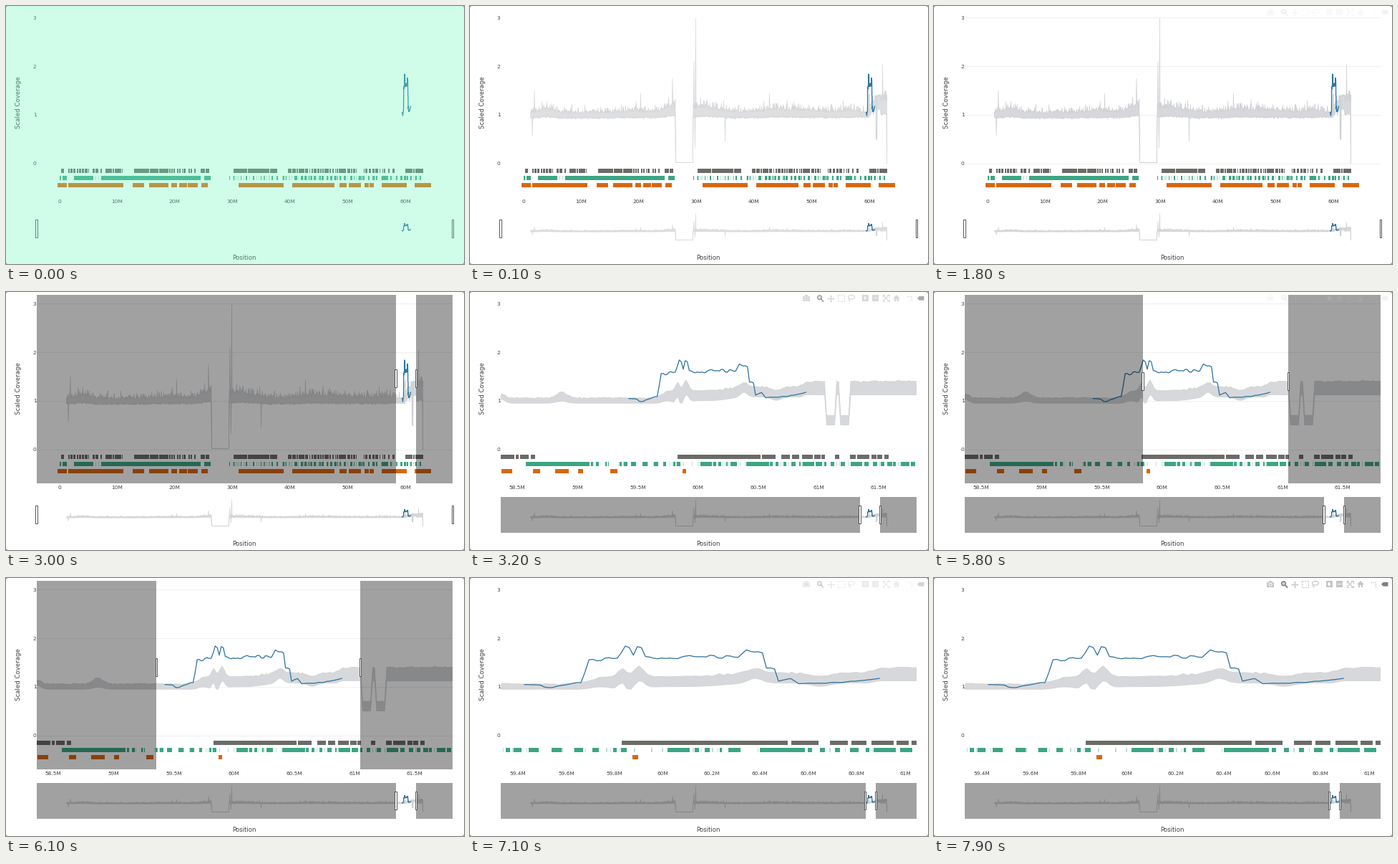
These frames come from a looping animation (640x360 px, 8 s). A matplotlib script:

```python
import math

import matplotlib.pyplot as plt
import numpy as np
from matplotlib.animation import FuncAnimation
from matplotlib.patches import Circle, Polygon, Rectangle

W, H, DPI = 640, 360, 100
STEP, COUNT = 100, 80
LEFT, RIGHT, TOP, BOTTOM = 43, 623.5, 3.5, 267
VIEWS = [(-3.907, 68.1), (58.363, 61.81), (59.329, 61.046)]
TICK_STEP = [10, 0.5, 0.2]
INK, BLUE, BAND = "#404040", "#2f76a3", "#d7d8db"
GRAY, GREEN, ORANGE, PALE = "#6b6b68", "#3ca584", "#d6680f", "#b9e0d3"
SHADE = 0.37
BIN = 1 / 60  # width of one coverage bin, in M

plt.rcParams["font.family"] = "DejaVu Sans"
rng = np.random.default_rng(11)
fig = plt.figure(figsize=(W / DPI, H / DPI), dpi=DPI, facecolor="white")
ax = fig.add_axes([0, 0, 1, 1])
ax.set_xlim(0, W)
ax.set_ylim(H, 0)
ax.axis("off")


def pt(px):
    return px * 72 / DPI


def to_px(mb, view):
    lo, hi = VIEWS[view]
    return LEFT + (np.asarray(mb, float) - lo) / (hi - lo) * (RIGHT - LEFT)


def main_y(v):
    return 219.5 - 67.7 * v


def slider_y(v):
    return 326.3 - 12.4 * v


def clamp(u):
    return min(max(u, 0), 1)


def label(x, y, text, size, **kw):
    return ax.text(x, y, text, fontsize=pt(size), color=INK,
                   va="baseline", **kw)


def line(x, y, color, width, **kw):
    return ax.plot(x, y, color=color, lw=pt(width), **kw)[0]


def rect(x0, y0, x1, y1, **kw):
    return ax.add_patch(Rectangle((x0, y0), x1 - x0, y1 - y0, **kw))


# ---- coverage data -------------------------------------------------

def bump(x, at, width, height):
    return height * np.exp(-((x - at) / width) ** 2)


def rise(x, at, width, height):
    return height / (1 + np.exp((at - x) / width * 2))


def far_band(x):
    """Rough band over the whole range, with a gap and a few spikes."""
    up = (1.035 + bump(x, 3.8, 1.7, 0.08) + bump(x, 20, 5, 0.03)
          + bump(x, 25.6, 1.5, 0.1) + bump(x, 31, 4, 0.1)
          + bump(x, 46, 7, 0.06) + bump(x, 57, 2, 0.05)
          + bump(x, 62.5, 1.5, 0.25))
    low = 0.94 + 0.35 * (up - 1.035) + rng.normal(0, 0.012, x.size)
    up += np.minimum(rng.exponential(0.36 * (up - 0.94)), 0.22)
    gap = (x > 26.3) & (x < 29.4)
    up[gap] = low[gap] = 0.02
    for at, v in [(1.85, 1.5), (20.3, 1.45), (25.8, 1.76), (29.55, 2.1),
                  (29.85, 3), (42.6, 1.44), (55.4, 1.3), (62.25, 2.05)]:
        up[np.argmin(abs(x - at))] = v
    for at, v in [(1.5, 0.57), (29.7, 0.32), (34.9, 0.46), (62.95, 0)]:
        low[np.argmin(abs(x - at))] = v
    return up, low


def near_band(x):
    """Smooth band around the sample, with two deep dips."""
    up = (1.06 + rise(x, 59.7, 0.04, 0.15) + rise(x, 60.25, 0.1, 0.08)
          + rise(x, 60.87, 0.03, 0.11) + bump(x, 58.37, 0.04, 0.08)
          + bump(x, 58.87, 0.06, 0.12) + bump(x, 59.83, 0.02, 0.18)
          + bump(x, 59.9, 0.03, 0.2) + bump(x, 60.38, 0.04, 0.1)
          + bump(x, 60.65, 0.06, -0.07))
    thick = (0.11 + rise(x, 59.7, 0.05, 0.1) + rise(x, 60.87, 0.05, 0.07)
             + bump(x, 58.87, 0.06, 0.08) + bump(x, 59.86, 0.06, 0.12))
    low = up - thick
    up = up + rng.normal(0, 0.008, x.size)
    dip = ((x > 61.055) & (x < 61.145)) | ((x > 61.18) & (x < 61.26))
    return np.where(dip, 0.7, up), np.where(dip, 0.5, low)


def build_band():
    far = np.arange(1.2, 62.98, 0.06)
    near = np.arange(58.35, 61.83, BIN)
    far_up, far_low = far_band(far)
    up, low = near_band(near)
    a, b = far < near[0], far > near[-1]
    return (np.r_[far[a], near, far[b]],
            np.r_[far_up[a], up, far_up[b]],
            np.r_[far_low[a], low, far_low[b]])


SAMPLE_KEYS = [
    (59.427, 1.04), (59.49, 1.04), (59.51, 0.99), (59.54, 0.99),
    (59.64, 1.09), (59.67, 1.09), (59.685, 1.55), (59.82, 1.6),
    (59.835, 1.86), (59.855, 1.86), (59.87, 1.62), (59.885, 1.62),
    (59.9, 1.96), (59.92, 1.64), (60.05, 1.56), (60.1, 1.66),
    (60.31, 1.59), (60.34, 1.77), (60.41, 1.71), (60.425, 1.38),
    (60.46, 1.38), (60.475, 1.12), (60.53, 1.18), (60.56, 1.06),
    (60.75, 1.09), (60.897, 1.18)]


def build_sample():
    x = np.arange(59.427, 60.9, BIN)
    v = np.interp(x, *zip(*SAMPLE_KEYS))
    wobble = np.repeat(rng.uniform(-1, 1, x.size), 2)[:x.size]
    return x, v + wobble * np.where(v > 1.5, 0.035, 0.008)


band_mb, band_up, band_low = build_band()
sample_mb, sample_v = build_sample()
plot_box = Rectangle((LEFT, TOP), RIGHT - LEFT, BOTTOM - TOP,
                     transform=ax.transData)


def draw_band(view, y, edge):
    poly = ax.fill_between(to_px(band_mb, view), y(band_up), y(band_low),
                           facecolor=BAND, edgecolor="#d0d1d4", lw=pt(edge),
                           zorder=1)
    if y is main_y:
        poly.set_clip_path(plot_box)
    return poly


def draw_sample(view, y):
    return line(to_px(sample_mb, view), y(sample_v), BLUE, 1.3, zorder=2)


# ---- annotation rows -----------------------------------------------

def spans(lo, hi, bar, gap):
    """Random bars and gaps of the given mean sizes between lo and hi."""
    out = []
    while lo < hi:
        end = min(lo + bar * rng.uniform(0.3, 1.7), hi)
        out.append((lo, end))
        lo = end + gap * rng.uniform(0.3, 1.7)
    return out


far_rows = [
    (227, GRAY, 0.3,
     spans(0.4, 8, 0.25, 0.5) + spans(8, 11, 0.3, 0.1)
     + spans(13, 19.3, 0.3, 0.1) + spans(19.5, 24, 0.15, 0.6)
     + spans(24.5, 25.9, 0.3, 0.15) + spans(30.2, 37.7, 0.3, 0.12)
     + spans(39.7, 51.6, 0.25, 0.2) + spans(52.8, 58.4, 0.2, 0.3)
     + spans(60, 63, 0.3, 0.1)),
    (237, PALE, 0, spans(29.5, 63, 0.1, 0.3) + spans(5.9, 7.3, 0.1, 0.3)),
    (237, GREEN, 0.3,
     [(0.1, 0.3), (0.6, 1.3), (2.6, 5.8), (7.3, 24.5), (25.1, 26.2),
      (55.9, 57)] + spans(29.5, 41, 0.1, 0.9) + spans(41, 63, 0.2, 0.5)),
    (247, ORANGE, 0.4,
     [(-0.2, 1.3), (1.6, 11.1), (12.8, 14.7), (15.6, 18.9), (19.5, 20.4),
      (20.8, 22.1), (22.3, 24), (24.7, 25.7), (31.1, 38.9), (40.4, 47.6),
      (48.6, 49.8), (50.2, 52.2), (52.9, 53.6), (53.8, 54.5), (55.9, 60.2),
      (61.6, 64.4)]),
]

near_rows = [
    (227, GRAY, 0.3,
     spans(58.36, 58.65, 0.07, 0.01)
     + [(59.83, 60.515), (60.53, 60.64)] + spans(60.69, 61.05, 0.06, 0.014)
     + [(61.14, 61.17)] + spans(61.26, 61.58, 0.07, 0.015)),
    (237, PALE, 0, spans(59.1, 61.8, 0.004, 0.04)),
    (237, GREEN, 0.3,
     [(58.57, 59.095), (60.02, 60.11), (60.27, 60.32), (60.4, 60.585),
      (60.87, 60.96), (60.98, 61.03), (61.27, 61.36)]
     + spans(59.11, 59.3, 0.01, 0.05) + spans(59.35, 59.85, 0.025, 0.045)
     + spans(60.13, 60.25, 0.015, 0.03) + spans(60.6, 60.85, 0.02, 0.03)
     + spans(61.05, 61.26, 0.02, 0.04) + spans(61.38, 61.81, 0.04, 0.03)),
    (247, ORANGE, 1,
     [(c - w / 2, c + w / 2) for c, w in
      [(58.415, 0.08), (58.66, 0.05), (58.87, 0.1), (59.025, 0.035),
       (59.3, 0.05), (59.885, 0.02)]]),
]


def draw_row(view, y, color, pad, bars):
    lo, hi = VIEWS[view]
    ends = [to_px((max(a, lo), min(b, hi)), view)
            for a, b in bars if b > lo and a < hi]
    return ax.broken_barh([(a - pad, b - a + 2 * pad) for a, b in ends],
                          (y - 0.3, 6.6), facecolor=color, lw=0, zorder=1.5)


def draw_view(view):
    items = [draw_band(view, main_y, 0.7), draw_sample(view, main_y)]
    items += [draw_row(view, *row) for row in (near_rows if view else far_rows)]
    lo, hi = VIEWS[view]
    step = TICK_STEP[view]
    for k in range(math.ceil(lo / step), math.floor(hi / step) + 1):
        mb = round(k * step, 2)
        text = f"{mb:g}M" if mb else "0"
        items.append(label(to_px(mb, view), 274.8, text, 7.4, ha="center"))
    return items


# ---- fixed parts ---------------------------------------------------

grid = [line([LEFT, RIGHT], [main_y(v)] * 2, "#f0f0f0", 1, zorder=0.5)
        for v in range(4)]
for v in range(4):
    label(42.5, main_y(v) + 2.7, str(v), 7.4, ha="right")
label(333.2, 354, "Position", 8.7, ha="center")
label(20.4, 135, "Scaled Coverage", 8.6, ha="center", rotation=90,
      rotation_mode="anchor")
for cx in (0, W):
    for cy in (0, H):
        dx, dy = (-2 if cx else 2), (-2 if cy else 2)
        ax.add_patch(Polygon([(cx, cy), (cx + dx, cy), (cx, cy + dy)],
                             color="#8c8c8c", lw=0))

views = [draw_view(v) for v in range(3)]
main_band = views[0][0]
slider_band = draw_band(0, slider_y, 0.6)
draw_sample(0, slider_y)


def mask():
    return rect(0, 0, 0, 0, facecolor="black", lw=0, alpha=SHADE, zorder=4)


def grip():
    return rect(0, 0, 2.4, 25, facecolor="white", edgecolor="#444444",
                lw=pt(0.9), zorder=5)


drag_masks, slider_masks = [mask(), mask()], [mask(), mask()]
drag_grips, slider_grips = [grip(), grip()], [grip(), grip()]


def place(masks, grips, lo, hi, y0, y1, grip_y):
    masks[0].set_bounds(LEFT, y0, lo - LEFT, y1 - y0)
    masks[1].set_bounds(hi, y0, RIGHT - hi, y1 - y0)
    grips[0].set_xy((lo - 1.7, grip_y))
    grips[1].set_xy((hi - 0.9, grip_y))


# ---- toolbar -------------------------------------------------------

def build_toolbar():
    soft, strong = "#c6c6c6", "#808080"
    mid = 8.5
    parts = []

    def box(x, y, w, h, color=soft):
        parts.append(rect(x - w / 2, y - h / 2, x + w / 2, y + h / 2,
                          facecolor=color, lw=0, zorder=6))

    def stroke(xs, ys, color=soft, width=1.2, **kw):
        parts.append(line(xs, ys, color, width, zorder=6.2, **kw))

    def ring(x, y, r, edge, width, fill):
        parts.append(ax.add_patch(Circle((x, y), r, facecolor=fill,
                                         edgecolor=edge, lw=pt(width),
                                         zorder=6.1)))

    def shape(points, color):
        parts.append(ax.add_patch(Polygon(points, color=color, lw=0,
                                          zorder=6)))

    # camera, magnifier
    box(470.2, 9, 9.5, 7)
    box(470.2, 5, 4.5, 2)
    ring(470.2, 9, 2, "white", 1, soft)
    ring(488.5, 7.7, 2.9, strong, 1.5, "#d0d0d0")
    stroke([490.7, 493.5], [10, 13], strong, 1.8)
    # pan arrows
    for dx, dy, mark in [(-4, 0, "<"), (4, 0, ">"), (0, -4, "^"), (0, 4, "v")]:
        stroke([504, 504 + dx], [mid, mid + dy], marker=mark, ms=pt(2.6),
               mew=0, markevery=[1])
    # box and lasso selection
    stroke([514, 523, 523, 514, 514], [4, 4, 13, 13, 4], dashes=(1.6, 1.2))
    a = np.linspace(0, 2 * np.pi, 30)
    stroke(533 + 4.5 * np.cos(a), 7.3 + 2.8 * np.sin(a))
    stroke([530, 529.5, 531], [9.5, 11, 12.8])
    # zoom in, zoom out, fit
    for x in (552, 566.5):
        box(x, mid, 9, 9)
        box(x, mid, 5, 1.4, "white")
    box(552, mid, 1.4, 5, "white")
    stroke([577.5, 585], [4.7, 12.3])
    stroke([577.5, 585], [12.3, 4.7])
    for sx in (-1, 1):
        for sy in (-1, 1):
            cx, cy = 581.2 + 4.4 * sx, mid + 4.4 * sy
            stroke([cx - 2.4 * sx, cx, cx], [cy, cy, cy - 2.4 * sy], width=1)
    # home, spike lines, hover tag
    shape([(591, 9), (596, 4), (601, 9)], soft)
    box(596, 10.8, 6.6, 3.8)
    box(596, 11.2, 2, 3, "white")
    stroke([610, 616.5, 616.5], [5.5, 5.5, 13], dashes=(1.4, 1))
    shape([(625, 8.7), (627.8, 5.8), (634.5, 5.8), (634.5, 11.6),
           (627.8, 11.6)], strong)
    return parts


toolbar = build_toolbar()
tint = rect(0, 0, W, H, facecolor=(113 / 255, 249 / 255, 191 / 255),
            alpha=0.33, lw=0, zorder=9)


# ---- motion --------------------------------------------------------

# pointer enters or releases, then presses again
HOVERS = [(1000, 1600), (3100, 5600), (7100, 9000)]


def toolbar_alpha(t):
    for shown, pressed in reversed(HOVERS):
        if t >= shown:
            fade_in = clamp((t - shown + STEP) / 300)
            fade_out = clamp((t - pressed + 70) / 300)
            return fade_in * (1 - fade_out)
    return 0


def drag_state(t):
    """Left edge, right edge, grip height and shade strength, or None."""
    if 1900 <= t < 3100:
        view, start, length, power, grip_y = 0, 1800, 1100, 2, 107.5
    elif 5700 <= t < 7100:
        view, start, length, power, grip_y = 1, 5600, 800, 4.2, 111.5
    else:
        return None
    lo, hi = to_px(VIEWS[view + 1], view)
    left = clamp((t - start) / length)
    return (lo + (hi - lo) * (1 - left) ** power, hi, grip_y,
            clamp((t - start) / 200))


def draw(i):
    t = i * STEP
    view = 0 if t < 3100 else 1 if t < 7100 else 2
    for k, items in enumerate(views):
        for item in items:
            item.set_visible(k == view)

    opening = t == 0
    tint.set_visible(opening)
    settle = clamp((t - 100) / 600)
    for band in (main_band, slider_band):
        band.set_alpha(0.82 + 0.18 * settle)
    main_band.set_visible(view == 0 and not opening)
    slider_band.set_visible(not opening)

    drag = drag_state(t)
    for g in grid:
        g.set_alpha(settle if view == 0 or drag else 0.12)
    for item in drag_masks + drag_grips:
        item.set_visible(drag is not None)
    if drag:
        lo, hi, grip_y, strength = drag
        place(drag_masks, drag_grips, lo, hi, TOP, BOTTOM, grip_y)
        for m in drag_masks:
            m.set_alpha(SHADE * strength)

    lo, hi = to_px(VIEWS[view], 0)
    place(slider_masks, slider_grips, lo, hi, 286, 335.5, 298.3)

    alpha = toolbar_alpha(t)
    for part in toolbar:
        part.set_visible(alpha > 0)
        part.set_alpha(alpha)
    return []


anim = FuncAnimation(fig, draw, frames=COUNT, interval=STEP, repeat=True,
                     repeat_delay=0, init_func=lambda: [], blit=False)
plt.show()
```
